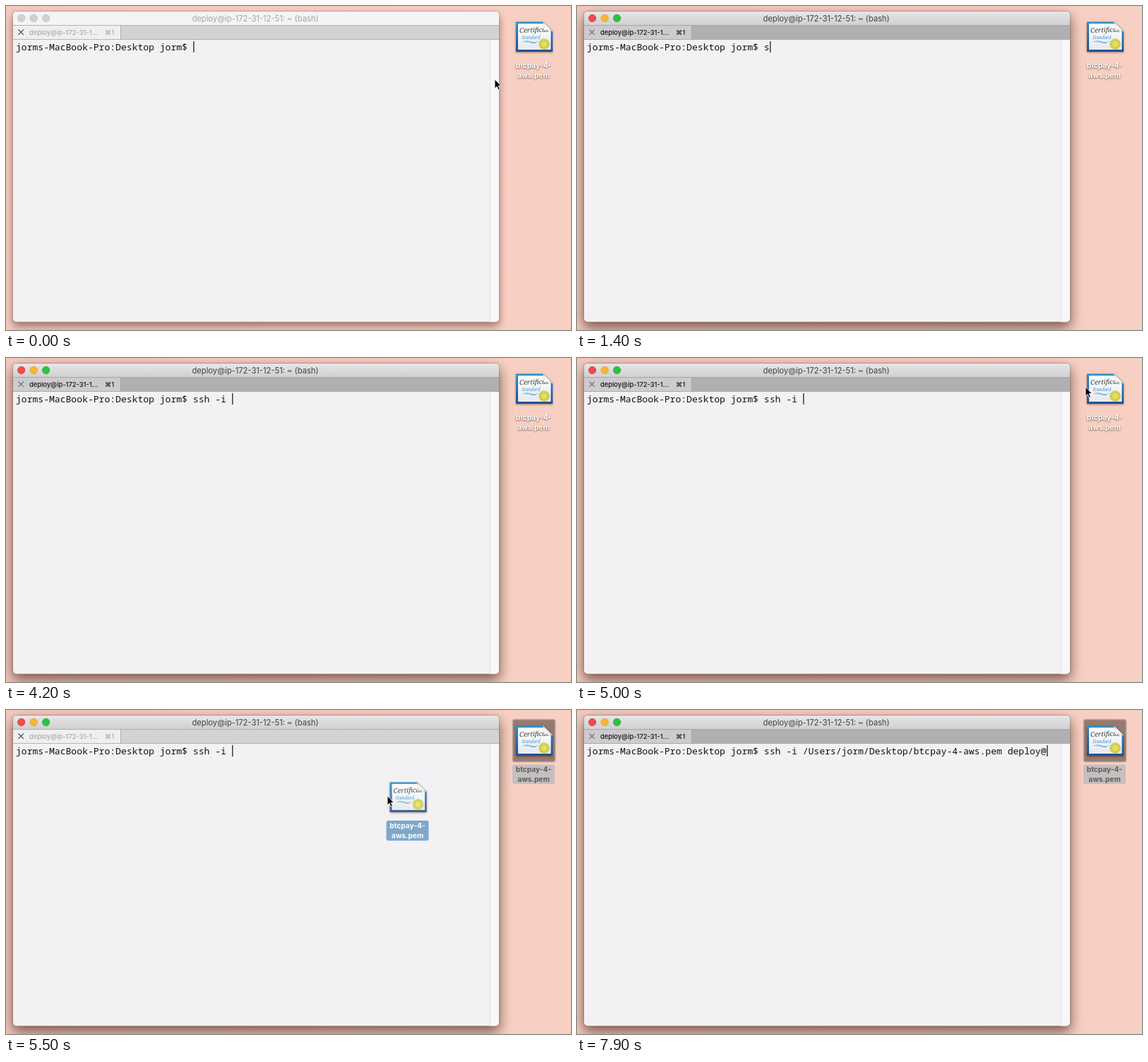
Recreate the animation shown at these times as an HTML page. Size 800x460 px, loop 8000 ms.

```html
<!DOCTYPE html>
<html lang="en">
<head>
<meta charset="utf-8">
<title>Terminal drag and drop</title>
<style>
  html, body { margin: 0; width: 100%; height: 100%; overflow: hidden; background: #f6cec2; }
  svg { display: block; width: 800px; height: 460px; }
  text { font-family: Inter, Roboto, sans-serif; white-space: pre; }
  .mono { font: 13.07px "Noto Sans Mono", monospace; fill: #111; }
  .title { font-size: 11.2px; text-anchor: middle; fill: #404040; }
  .tab-text { font-size: 9.3px; font-weight: 500; fill: #151515; }
  .cross { stroke: #727073; stroke-width: 1.1; }
  .script { font: italic 9.6px "Noto Serif", serif; fill: #34383f; }
  .small-script { font: italic 6.2px "Noto Serif", serif; fill: #4795cc; }
  .label { font-size: 10.2px; font-weight: 700; text-anchor: middle; fill: #fff; }
  #name { filter: drop-shadow(0 1px 1px rgba(70, 35, 25, .75)); }
  .picked #name { filter: none; }
  .picked #name text { fill: #5b5d60; }
  #selection { display: none; }
  .picked #selection { display: inline; }
  #frame { filter: drop-shadow(0 8px 9px rgba(75, 35, 25, .5)) drop-shadow(0 0 1px rgba(60, 40, 35, .6)); }

  .dim-title #frame { filter: drop-shadow(0 6px 6px rgba(75, 35, 25, .38)) drop-shadow(0 0 1px rgba(60, 40, 35, .5)); }
  .dim-title #titlebar { fill: #f5f4f5; }
  .dim-title .title { fill: #a5a4a5; }
  .dim-title .light { fill: #d2d1d2; stroke: #bdbcbd; }
  .dim-tab #tabbar { fill: #d4d3d4; }
  .dim-tab #tab { fill: #f0eff0; }
  .dim-tab .tab-text { fill: #aaa9aa; }
  .dim-tab .cross { stroke: #454545; }
</style>
</head>
<body>
<svg id="stage" viewBox="0 0 800 460">
  <defs>
    <linearGradient id="wall">
      <stop offset="0" stop-color="#f3cabe"/><stop offset="1" stop-color="#f8d0c3"/>
    </linearGradient>
    <linearGradient id="bar" x2="0" y2="1">
      <stop offset="0" stop-color="#e7e6e7"/><stop offset="1" stop-color="#d0cfd0"/>
    </linearGradient>
    <linearGradient id="edge" x2="0" y2="1">
      <stop offset="0" stop-color="#2c93c8"/><stop offset="1" stop-color="#234d91"/>
    </linearGradient>
    <linearGradient id="paper" x2="0" y2="1">
      <stop offset="0" stop-color="#fff"/><stop offset="1" stop-color="#e6eaee"/>
    </linearGradient>
    <clipPath id="shape"><rect x="10" y="8" width="688" height="440.5" rx="5"/></clipPath>

    <g id="certificate">
      <path d="M722 22.5H761L774 35.5V65H722Z" fill="url(#edge)"
        style="filter:drop-shadow(0 1px 1.5px rgba(50,25,20,.5))"/>
      <path d="M725 25H760.5L771.5 36V62H725Z" fill="url(#paper)"/>
      <text class="script" x="727" y="38" transform="rotate(-2 727 38)">Certificae</text>
      <text class="small-script" x="730" y="47.3">Standard</text>
      <path d="M732 51q5-3 9 0t8 0M736 51.5q5-3 9 0t8-2" fill="none" stroke="#67a8d6" stroke-width=".9"/>
      <path d="M760.5 22.5Q763 29 761.5 34.5Q768 33 774 36Z" fill="#f5f5f5" stroke="#c9cbcd" stroke-width=".6"/>
      <circle cx="762" cy="54" r="7" fill="#d9d64a" stroke="#c4bd35" stroke-width="1.5" stroke-dasharray="1.4 .8"/>
      <circle cx="762" cy="54" r="4.6" fill="#e4e168" stroke="#bdb83a" stroke-width=".6"/>
    </g>
    <g id="caption" class="label">
      <text class="label" x="747" y="88">btcpay-4-</text>
      <text class="label" x="747" y="102">aws.pem</text>
    </g>
  </defs>

  <rect width="800" height="460" fill="url(#wall)"/>

  <g id="frame"><rect x="10" y="8" width="688" height="440.5" rx="5" fill="#f3f1f4"/></g>
  <g clip-path="url(#shape)">
    <rect id="titlebar" x="10" y="8" width="688" height="20" fill="url(#bar)"/>
    <rect id="tabbar" x="10" y="27.5" width="688" height="20" fill="#b1afb1"/>
    <rect id="tab" x="10" y="28" width="152" height="19.5" fill="#cdcbce"/>
    <path d="M10 27.5H698M162.5 28V47M10 47.5H698" stroke="#9b999b" stroke-opacity=".65"/>
    <rect x="685" y="48" width="13" height="401" fill="#f8f7f9"/>
    <path d="M685.5 48V449" stroke="#e3e1e4"/>
  </g>
  <g stroke-width=".7">
    <circle class="light" cx="21.7" cy="17.3" r="5.2" fill="#f34a4b" stroke="#d83c3d"/>
    <circle class="light" cx="39.2" cy="17.3" r="5.2" fill="#f7b532" stroke="#dc9c27"/>
    <circle class="light" cx="56.6" cy="17.3" r="5.2" fill="#2fc140" stroke="#27a435"/>
  </g>
  <text class="title" x="353" y="21.8">deploy@ip-172-31-12-51: ~ (bash)</text>
  <path class="cross" d="M17.5 33.5l7.4 7.4m0-7.4l-7.4 7.4"/>
  <text class="tab-text" x="33" y="40.8">deploy@ip-172-31-1...</text>
  <text class="tab-text" x="140" y="40.8">⌘1</text>

  <text id="line" class="mono" x="14" y="62.5"></text>
  <rect id="caret" y="50" width="1.2" height="16" fill="#111"/>

  <g id="file">
    <g id="selection">
      <rect x="717.5" y="13.5" width="60" height="60" rx="3" fill="#96796f" stroke="#b89e95" stroke-width="1.6"/>
      <rect x="717" y="77.5" width="60" height="27.5" rx="3" fill="#c5bfbd"/>
    </g>
    <use href="#certificate"/>
    <g id="name"><use href="#caption" display="none"/>
      <text class="label" x="747" y="88">btcpay-4-</text>
      <text class="label" x="747" y="102">aws.pem</text>
    </g>
  </g>

  <g id="ghost" opacity=".88">
    <rect x="717" y="77" width="60" height="28.5" rx="3" fill="#6f9fc4"/>
    <use href="#certificate"/>
    <use href="#caption"/>
  </g>

  <path id="arrow" d="M0 0V13.2L3 10.4L5.2 15.2L7.4 14.2L5.2 9.6H9.2Z" fill="#000" stroke="#fff" stroke-width=".9"/>
  <g id="beam" fill="none">
    <path d="M-2.6-6.5Q0-6.5 0-4.5Q0-6.5 2.6-6.5M0-5V5M-2.6 6.5Q0 6.5 0 4.5Q0 6.5 2.6 6.5M-1.7 1.5H1.7"
      stroke="#fff" stroke-width="2.2" stroke-opacity=".8"/>
    <path d="M-2.6-6.5Q0-6.5 0-4.5Q0-6.5 2.6-6.5M0-5V5M-2.6 6.5Q0 6.5 0 4.5Q0 6.5 2.6 6.5M-1.7 1.5H1.7"
      stroke="#151515" stroke-width="1.1"/>
  </g>
</svg>
<script>
const LOOP = 8000, STEP = 100, CHAR = 7.843;
const PROMPT = 'jorms-MacBook-Pro:Desktop jorm$ ';
const PICK = 5100, DRAG = 5200, DROP = 5700;

// [time, typed text]
const typing = [
  [1400, 's'], [1500, 's'], [1800, 'h'], [2000, ' '], [2500, '-'], [3200, 'i'], [3400, ' '],
  [DROP, '/Users/jorm/Desktop/btcpay-4-aws.pem '],
  [7000, 'u'], [7100, 's'], [7200, 'e'], [7400, 'r'], [7500, '0'], [7600, '1'], [7900, '@']
];
const LOGIN = 'deploy';
typing.slice(8, 14).forEach((entry, i) => { entry[1] = LOGIN[i]; });

// [time, x, y]; no position means hidden while typing
const pointer = [
  [0, 692, 104], [100, 660, 110], [200, 570, 130], [300, 480, 146], [400, 443, 151], [1400],
  [4600, 455, 146], [4700, 510, 120], [4800, 600, 75], [4900, 690, 45], [5000, 720, 41],
  [5200, 672, 62], [5300, 607.5, 93], [5400, 565, 109], [5500, 540, 122], [5600, 528, 128],
  [5700, 522, 145], [5800, 516, 166], [5900, 514, 176], [7000]
];

const el = id => document.getElementById(id);
const [stage, line, caret, file, ghost, arrow, beam] =
  ['stage', 'line', 'caret', 'file', 'ghost', 'arrow', 'beam'].map(el);
const show = (node, on) => node.setAttribute('display', on ? 'inline' : 'none');
const move = (node, x, y) => node.setAttribute('transform', `translate(${x} ${y})`);

function draw(t) {
  const text = PROMPT + typing.filter(([at]) => at <= t).map(([, s]) => s).join('');
  line.textContent = text;
  caret.setAttribute('x', 14.3 + CHAR * text.length);

  const dragging = t >= DRAG && t < DROP;
  stage.classList.toggle('dim-title', t < 400);
  stage.classList.toggle('dim-tab', t < 400 || (t >= PICK && t < DROP));
  file.classList.toggle('picked', t >= PICK);
  show(ghost, dragging);

  const [, x, y] = pointer.filter(([at]) => at <= t).pop();
  const visible = x !== undefined;
  const overText = x < 685 && y > 48 && t < PICK;
  show(arrow, visible && !overText);
  show(beam, visible && overText);
  if (visible) {
    move(arrow, x, y);
    move(beam, x, y);
    move(ghost, x - 718.5, y - 42);
  }
}

const start = performance.now();
function tick() {
  const t = (performance.now() - start) % LOOP;
  draw(Math.floor(t / STEP) * STEP);
  requestAnimationFrame(tick);
}
tick();
</script>
</body>
</html>
```
